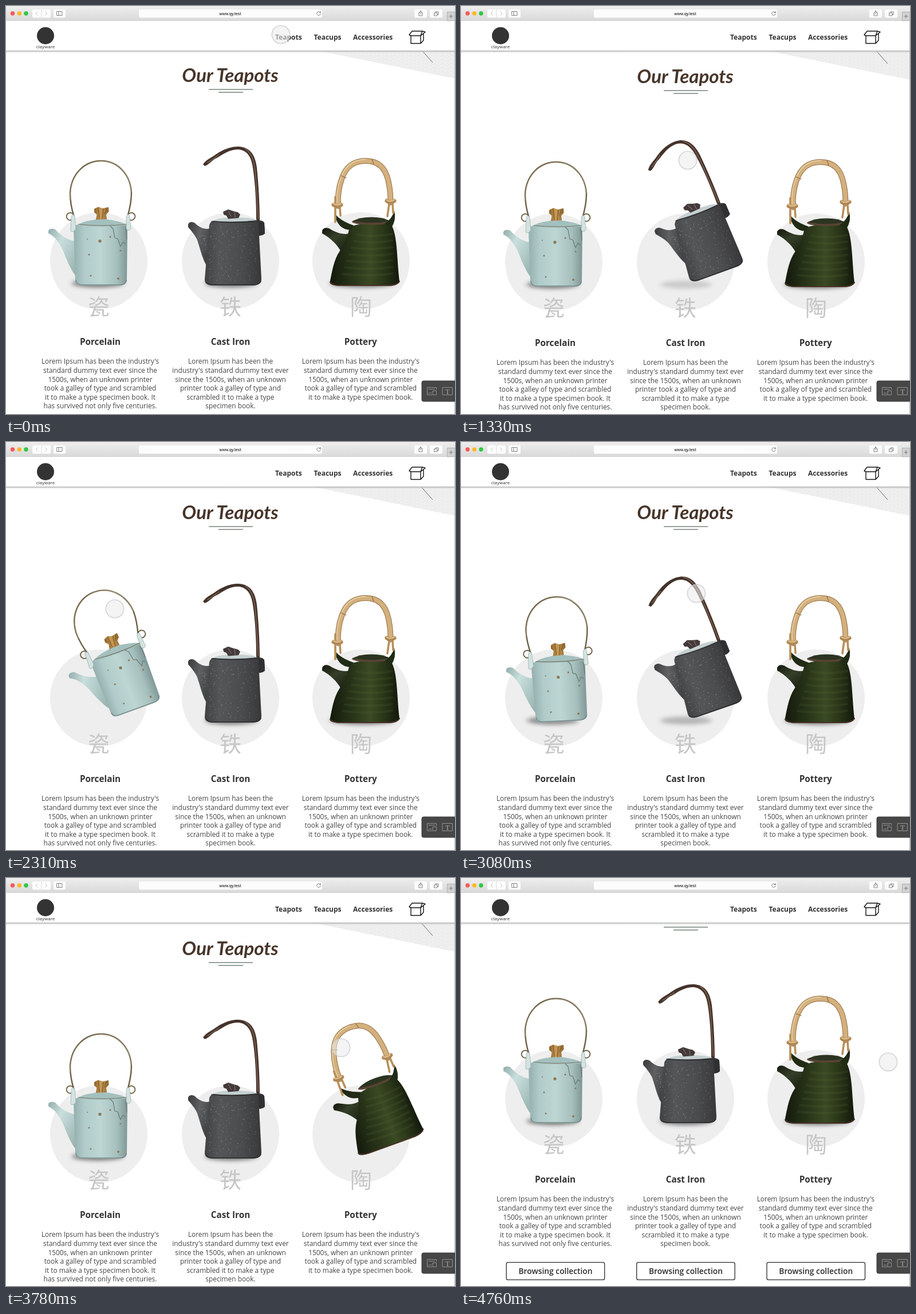
Animation of 784x714 px, one loop 4790 ms. Source, as an HTML page:

```html
<!DOCTYPE html>
<html lang="en">
<head>
<meta charset="utf-8">
<title>Our Teapots</title>
<style>
html, body { margin: 0; width: 100%; height: 100%; overflow: hidden; background: #fff; }
svg { display: block; width: 784px; height: 714px; font-family: "Open Sans", "Noto Sans", sans-serif; }
.nav { font-weight: 700; font-size: 12px; fill: #333; }
.head { font: italic 700 33px Lato, sans-serif; fill: #47352a; }
.glyph { font: 100 38px "Noto Sans CJK SC", "Noto Sans CJK", sans-serif; fill: #c6c6c6; }
.name { font-weight: 700; font-size: 15.3px; fill: #333; }
.copy { font-size: 11.88px; fill: #444; }
.btn { font-weight: 600; font-size: 13.8px; fill: #2c2c2c; }
.mid { text-anchor: middle; }
.line { fill: none; stroke-linecap: round; stroke-linejoin: round; }
</style>
</head>
<body>
<svg viewBox="0 0 784 714">
  <defs>
    <linearGradient id="bar" x2="0" y2="1"><stop stop-color="#eeeeee"/><stop offset="1" stop-color="#d9d9d9"/></linearGradient>
    <linearGradient id="drop" x2="0" y2="1"><stop stop-color="#a2a2a2"/><stop offset=".35" stop-color="#c4c4c4" stop-opacity=".7"/><stop offset="1" stop-color="#ddd" stop-opacity="0"/></linearGradient>
    <linearGradient id="celadon"><stop stop-color="#94b0ae"/><stop offset=".2" stop-color="#b0cbc9"/><stop offset=".5" stop-color="#bdd6d4"/><stop offset=".8" stop-color="#a6c0be"/><stop offset="1" stop-color="#7f9796"/></linearGradient>
    <linearGradient id="celadonSpout" x2="1" y2="1"><stop stop-color="#93adac"/><stop offset=".35" stop-color="#c9dfdd"/><stop offset="1" stop-color="#95b0ae"/></linearGradient>
    <linearGradient id="gold"><stop stop-color="#8c6227"/><stop offset=".45" stop-color="#c79a58"/><stop offset="1" stop-color="#8d652d"/></linearGradient>
    <linearGradient id="iron"><stop stop-color="#414244"/><stop offset=".25" stop-color="#545557"/><stop offset=".6" stop-color="#4b4c4e"/><stop offset="1" stop-color="#353537"/></linearGradient>
    <linearGradient id="ironSpout" x2="1" y2=".6"><stop stop-color="#3a3a3c"/><stop offset=".5" stop-color="#5f6062"/><stop offset="1" stop-color="#3f4042"/></linearGradient>
    <linearGradient id="moss"><stop stop-color="#14190c"/><stop offset=".25" stop-color="#232e16"/><stop offset=".58" stop-color="#3a4a23"/><stop offset=".8" stop-color="#273317"/><stop offset="1" stop-color="#12180b"/></linearGradient>
    <linearGradient id="mossSpout" x2=".6" y2="1"><stop stop-color="#13170e"/><stop offset=".4" stop-color="#353f28"/><stop offset="1" stop-color="#141a0d"/></linearGradient>
    <filter id="soft" x="-30%" y="-150%" width="160%" height="400%"><feGaussianBlur stdDeviation="5 3.5"/></filter>
    <pattern id="waves" width="14" height="7" patternUnits="userSpaceOnUse"></pattern>
    <path id="cane" d="M580 352C579 336 580 322 586 305C593 284 606 273 628 273C650 273 663 285 668 310C671 325 672 336 671 346"/>
  </defs>

  <rect width="784" height="714" fill="#fff"/>
  <g id="page">
    <path d="M440 59L784 129V59Z" fill="url(#waves)"/>
    <path d="M722 75L745 101" stroke="#555" stroke-width=".9"/>
    <text class="head mid" x="391.5" y="135">Our Teapots</text>
    <path d="M354 148H431M371 153H414" stroke="#76847a" stroke-width="1.7"/>
    <g id="columns"></g>

    <g id="pot0">
      <g class="line">
        <path d="M119 371C113 353 112 341 112 329C114 295 138 273 166 273C194 273 217 295 219 329C219 344 217 354 212 371" stroke="#6c6048" stroke-width="2.4"/>
        <path d="M113 340C109 300 137 274 166 273.600C194 274 216 292 218.500 327" stroke="#b4a888" stroke-width=".8"/>
        <path d="M118 373a6.500 6.500 0 1 1-1-7M213 373a6.500 6.500 0 1 0 1-7" stroke="#75674b" stroke-width="2"/>
      </g>
      <path d="M74 395C76 391 82 391 86 393C92 400 104 411 122 414V474C117 470 108 452 102 436C96 420 86 405 74 400Z" fill="url(#celadonSpout)"/>
      <path d="M118 393Q120 384 130 383H205Q212 384 212 392L211 483Q210 490 200 491H130Q121 490 121 482Z" fill="url(#celadon)"/>
      <path d="M122 482Q123 489 131 490H200Q209 489 210 482" class="line" stroke="#748a88" stroke-width="1.500"/>
      <path d="M114 370Q117 364 120 370L122 392Q118 399 113 396ZM210 370Q214 363 216 370L218 392Q214 397 210 392Z" fill="#d3e3e1" stroke="#93aaa8" stroke-width=".7"/>
      <path d="M124 386Q132 379 152 376.500Q166 373 180 376Q206 380 212 386Q168 390 124 386Z" fill="#a3c0be"/>
      <path d="M127 384Q168 388.500 210 384" class="line" stroke="#7c7464" stroke-width="1.200"/>
      <path d="M154 357L161 353.500L169 356L179 354L179.500 362L175 367L176 375L157 376L158.500 367L154 363Z" fill="url(#gold)"/>
      <path d="M161 355L163 374M170 357L168 375M176 356L172 366" class="line" stroke="#75501d" stroke-width="1"/>
      <path d="M182 387L187 392L190 408L195 409L200 423L204 415L208 418M209 390L211 410" class="line" stroke="#657b76" stroke-width="1.200"/>
      <g fill="#8e7a59"><circle cx="164" cy="413.500" r="2.700"/><circle cx="145" cy="437" r="1.500"/><circle cx="182" cy="406" r="1.600"/><circle cx="200" cy="430" r="1.600"/><circle cx="148" cy="474" r="1.500"/><circle cx="196" cy="479" r="2"/><circle cx="142" cy="410" r="1"/></g>
    </g>

    <g id="pot1">
      <path d="M344 279C350 270 360 267 366 262C380 252 395 247.500 406 248C426 249 435 262 438 285C441 315 443 350 443 378H437C437 345 435 310 431 285C428 264 420 254 405 253C390 253 378 262 368 268C360 271 356 279 347 282Z" fill="#44332b"/>
      <path d="M352 276Q362 270 372 262M418 252C430 260 434 275 436 300L440.500 374" class="line" stroke="#7d6250" stroke-width="1.600"/>
      <path d="M318 384C320 379 326 379 330 382C338 390 348 394 357 391L351 457C344 448 340 430 334 412C330 402 322 394 318 389Z" fill="url(#ironSpout)"/>
      <path d="M355 385Q357 378 366 377H440Q450 377 451 382L452 400Q448 404 442 404L446 480Q446 490 432 491H360Q346 490 347 480Z" fill="url(#iron)"/>
      <path d="M441 379L442 403Q448 404 452 400L451 381Z" fill="#303032"/>
      <path d="M361 378Q372 372 398 372Q430 372 439 377Q400 381 361 378Z" fill="#c5d0d1"/>
      <path d="M359 379Q400 383 441 378" class="line" stroke="#2c2c2e" stroke-width="1.300"/>
      <path d="M379 362L388 358L397 361L405 363L409 367L406 373L388 374.500L385 369L380 367Z" fill="#44393a"/>
      <path d="M388 361L393 370M399 363L400 372" class="line" stroke="#8b7d7b" stroke-width="1"/>
      <g id="grit"></g>
      <path d="M349 485Q353 490 362 490H432Q442 490 445 484" class="line" stroke="#2b2b2d" stroke-width="1.600"/>
    </g>

    <g id="pot2">
      <path d="M552 395C554 389 562 389 567 393C580 400 592 404 606 398L592 445C585 430 578 420 570 413C564 407 556 402 552 400Z" fill="url(#mossSpout)"/>
      <path d="M600 388Q640 377 671 382C684 400 682 440 687 484Q686 490 670 492H584Q566 491 565.500 486C570 462 573 446 582 432C590 420 597 406 600 388Z" fill="url(#moss)"/>
      <g id="rings" class="line" stroke="#5d6f3b" stroke-width="4" opacity=".16"></g>
      <path d="M566 485Q570 491 584 491H670Q684 490 687 484" class="line" stroke="#4a3225" stroke-width="2"/>
      <ellipse cx="638" cy="379.500" rx="34" ry="5.500" fill="#594334"/>
      <path d="M606 378.500Q616 371.500 638 371.500T670 378.500Q638 384 606 378.500Z" fill="#2b3420"/>
      <path d="M573 363Q581 377 607 386L601 394Q578 393 573 363ZM678 360Q674 375 661 383L673 390Q682 376 678 360Z" fill="#202a15"/>
      <g class="line">
        <use href="#cane" stroke="#957145" stroke-width="9.800"/>
        <use href="#cane" stroke="#d3b07d" stroke-width="7.800"/>
        <path d="M578 346C577 334 578 320 584 304C591 283 605 270.500 628 270.500" stroke="#e6cda2" stroke-width="1.800"/>
        <path d="M575 336V380M583 354L584 369M669 348L666 370M675 347L676 364" stroke="#b98f58" stroke-width="3.600"/>
        <path d="M639 270L642 279M585 299L594 303" stroke="#8f6b3d" stroke-width="1.200"/>
        <path d="M572 350Q579 354 585 350M665 343Q671 348 678 343" stroke="#b08854" stroke-width="7"/>
        <path d="M572 348Q579 352 585 348M665 341.500Q671 346 678 341" stroke="#dcbd8c" stroke-width="2.400"/>
      </g>
    </g>
  </g>

  <g id="header">
    <rect y="78" width="784" height="4.500" fill="url(#drop)"/>
    <rect y="26" width="784" height="52" fill="#fff"/>
    <circle cx="69" cy="52" r="15" fill="#333"/>
    <text x="69" y="74" class="mid" font-size="8" fill="#333">clayware</text>
    <g class="nav"><text x="470" y="59">Teapots</text><text x="537.500" y="59">Teacups</text><text x="606" y="59">Accessories</text></g>
    <path class="line" stroke="#151515" stroke-width="1.400" d="M707 52H724V65.500H707ZM724 65.500L729 60V49M707 52L704 50.500L709 44H727L724 52M727 44L732 45.500L724 52"/>
    <path d="M783.500 26V714" stroke="#bdbdbd"/>
  </g>

  <g id="browser">
    <rect width="784" height="26" fill="url(#bar)"/>
    <path d="M0 25.500H784" stroke="#cfcfcf"/>
    <circle cx="11.500" cy="13" r="3.700" fill="#fb5b58"/><circle cx="23.300" cy="13" r="3.700" fill="#fdb827"/><circle cx="35" cy="13" r="3.700" fill="#2fc840"/>
    <g fill="#fcfcfc">
      <rect x="46" y="6" width="32" height="14.500" rx="2.500"/><rect x="83" y="6" width="21" height="14.500" rx="2.500"/>
      <rect x="232" y="6" width="320" height="14.500" rx="2.500"/>
      <rect x="713" y="6" width="22" height="14.500" rx="2.500"/><rect x="740" y="6" width="22" height="14.500" rx="2.500"/>
    </g>
    <path d="M62 6V20.500" stroke="#e0e0e0"/>
    <g class="line" stroke="#777" stroke-width=".9">
      <path d="M55 10L52.500 13L55 16M69 10L71.500 13L69 16" stroke="#bbb"/>
      <path d="M89 9.500H98V16.500H89ZM92 9.500V16.500"/>
      <path d="M549 11.500A3.300 3.300 0 1 0 549.300 14M549.500 9.500V11.700H547"/>
      <path d="M722.500 11.500H721V17H727V11.500H725.500M724 14V8.500M722.300 10L724 8.500L725.700 10"/>
      <path d="M748 12H753V17H748ZM750 12V10H755V15H753"/>
    </g>
    <text class="mid" x="391.500" y="15.800" font-size="7.200" style="font-family:'Liberation Sans',sans-serif">www.qy.test</text>
    <path d="M770.500 26V10.500H784V25.500Z" fill="#d2d2d2" stroke="#b0b0b0"/>
    <path d="M773.500 18H780.500M777 14.500V21.500" stroke="#777"/>
  </g>

  <g id="tools">
    <path d="M784 656H729Q726 656 726 659V689Q726 692 729 692H784Z" fill="#474747" stroke="#3c3c3c"/>
    <g class="line" stroke="#929292">
      <path d="M744 680.500H735.500V667.500H751.500V671M738 670.500H748.500M738 677.500H743M745.500 673.500H751.500V680.500H745.500Z"/>
      <path d="M762.500 667.500H779.500V680.500H762.500Z"/>
    </g>
    <text class="mid" x="771" y="678.500" font-size="13" fill="#a8a8a8" style="font-family:'Liberation Serif',serif">T</text>
  </g>

  <circle id="cursor" r="15.700" fill="#ececec" fill-opacity=".58" stroke="#c8c8c8" stroke-opacity=".75" stroke-width="1.600"/>
</svg>

<script>
const LOOP = 4790, STEP = 70;
const $ = id => document.getElementById(id);

const pots = [
  { name: 'Porcelain', glyph: '瓷', disc: 162, mid: 164.5, shade: 160, pivot: [130.5, 302], hover: [[1980, 2915]],
    copy: ["Lorem Ipsum has been the industry's", 'standard dummy text ever since the', '1500s, when an unknown printer', 'took a galley of type and scrambled', 'it to make a type specimen book. It', 'has survived not only five centuries.'] },
  { name: 'Cast Iron', glyph: '铁', disc: 392, mid: 392, shade: 393, pivot: [358, 332], hover: [[1100, 1960], [2910, 3290]],
    copy: ['Lorem Ipsum has been the', "industry's standard dummy text ever", 'since the 1500s, when an unknown', 'printer took a galley of type and', 'scrambled it to make a type', 'specimen book.'] },
  { name: 'Pottery', glyph: '陶', disc: 620, mid: 619.3, shade: 622, pivot: [581, 344], hover: [[3400, 4020]],
    copy: ["Lorem Ipsum has been the industry's", 'standard dummy text ever since the', '1500s, when an unknown printer', 'took a galley of type and scrambled', 'it to make a type specimen book.'] }
];

// Time, then the value or the point
const scrollKeys = [[0, 2], [1050, 2], [1190, 0], [4340, 0], [4760, 62]];
const cursorKeys = [
  [0, 480, 50], [560, 480, 50], [1050, 396, 240], [1190, 396, 270], [1750, 396, 270],
  [2170, 190, 292], [2770, 190, 292], [3080, 411, 265], [3220, 411, 265],
  [3570, 585, 297], [3990, 585, 297], [4340, 746, 322], [LOOP, 746, 322]
];

const clamp = v => Math.min(1, Math.max(0, v));
const easeOut = v => 1 - (1 - clamp(v)) ** 3;
const smooth = v => v * v * (3 - 2 * v);

function sample(keys, t) {
  const i = keys.findIndex(k => k[0] > t);
  if (i < 0) return keys[keys.length - 1].slice(1);
  const a = keys[i - 1], b = keys[i], p = smooth((t - a[0]) / (b[0] - a[0]));
  return a.slice(1).map((v, n) => v + (b[n + 1] - v) * p);
}

let seed = 11;
const rand = () => (seed = seed * 16807 % 2147483647) / 2147483647;

const label = (cls, x, y, s) => `<text class="${cls} mid" x="${x}" y="${y}">${s}</text>`;

$('columns').innerHTML = pots.map((p, i) => `
  <circle cx="${p.disc}" cy="448" r="85" fill="#eee"/>
  <ellipse id="shade${i}" cx="${p.shade}" cy="487.5" rx="${i === 2 ? 56 : 45}" ry="7" fill="#555" filter="url(#soft)"/>
  ${label('glyph', p.disc, 542, p.glyph)}
  ${label('name', p.mid, 595, p.name)}
  ${p.copy.map((s, n) => label('copy', p.mid, 628.4 + n * 15.6, s)).join('')}
  <rect x="${p.mid - 85.3}" y="734.7" width="171.500" height="30.500" rx="3" fill="#fff" stroke="#2c2c2c" stroke-width="1.300"/>
  ${label('btn', p.mid + .5, 755, 'Browsing collection')}`).join('');

// Overlapping scales: later rows cover the earlier ones
$('waves').innerHTML = '<rect width="14" height="7" fill="#e9e9e9"/>' +
  [[7, 0], [0, 3.5], [14, 3.5], [7, 7], [0, 10.5], [14, 10.5]].map(([x, y]) => [7, 4.2].map(r =>
    `<circle cx="${x}" cy="${y}" r="${r}" fill="#e9e9e9" stroke="#f8f8f8"/>`).join('')).join('');

$('grit').innerHTML = Array.from({ length: 340 }, (_, i) => {
  const spout = i % 8 === 0, y = spout ? 398 + rand() * 35 : 386 + rand() * 97;
  const x = spout ? 333 + (y - 398) * .3 + rand() * 14 : 355 + rand() ** 1.3 * 84;
  return `<circle cx="${x}" cy="${y}" r="${.25 + rand() * .5}" fill="#b5b6b8" opacity="${.25 + rand() * .5}"/>`;
}).join('');

$('rings').innerHTML = Array.from({ length: 7 }, (_, i) => {
  const y = 402 + i * 11.5, left = 612 - i * 4;
  return `<path d="M${left} ${y}Q640 ${y + 5} 674 ${y - 1}"/>`;
}).join('');

function draw(t) {
  const scroll = Math.round(sample(scrollKeys, t)[0]);
  $('page').setAttribute('transform', `translate(0 ${-scroll})`);
  pots.forEach((p, i) => {
    let tilt = 0, lift = 0;
    for (const [on, off] of p.hover) {
      const back = 1 - easeOut((t - off) / 350);
      tilt = Math.max(tilt, easeOut((t - on) / 270) * back);
      lift = Math.max(lift, clamp((t - on) / 330) * back);
    }
    $('pot' + i).setAttribute('transform', `rotate(${-20 * tilt} ${p.pivot})`);
    $('shade' + i).setAttribute('opacity', .75 * (1 - lift));
  });
  $('cursor').setAttribute('transform', `translate(${sample(cursorKeys, t)})`);
}

const start = performance.now();
function tick() {
  const t = (performance.now() - start) % LOOP;
  draw(Math.floor(t / STEP) * STEP);
  requestAnimationFrame(tick);
}
tick();
</script>
</body>
</html>
```
